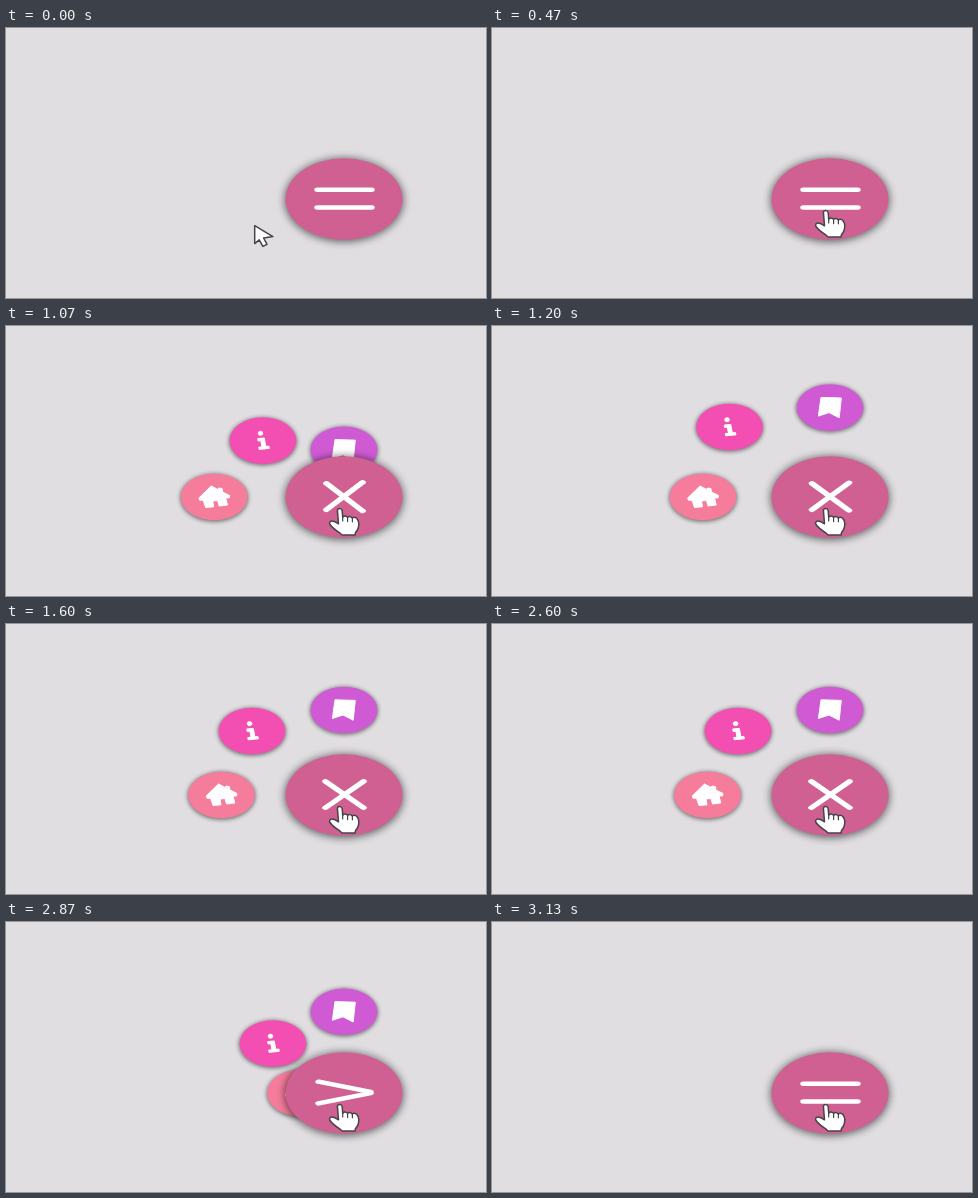
Write an HTML page that moves like this. It is 480 by 270 pixels and loops after 3.19 s.

```html
<!DOCTYPE html>
<html lang="en">
<head>
<meta charset="utf-8">
<title>Radial menu</title>
<style>
  html, body { margin: 0; width: 100%; height: 100%; overflow: hidden; background: #e0dee0; }
  svg { display: block; width: 100vw; height: 100vh; }
  .icon { fill: #fff; stroke: #fff; stroke-width: 1; stroke-linejoin: round; }
  .bar { stroke: #fff; stroke-width: 6.4; stroke-linecap: round; }
  .cursor { fill: #fff; stroke: #45434a; stroke-width: 1.5; stroke-linejoin: round; stroke-linecap: round; }
</style>
</head>
<body>
<svg viewBox="0 0 480 270">
  <defs>
    <filter id="soft" x="-30%" y="-30%" width="160%" height="160%"><feGaussianBlur stdDeviation="2"/></filter>
    <filter id="deep" x="-30%" y="-30%" width="160%" height="160%"><feGaussianBlur stdDeviation="4.5"/></filter>
  </defs>
  <g id="items"></g>
  <g transform="translate(338 171)">
    <ellipse cy="1" rx="59" ry="41.5" opacity=".6" filter="url(#deep)"/>
    <ellipse rx="58.5" ry="40.7" fill="#d06092"/>
    <g transform="translate(.5 -.4) scale(1 .69)">
      <path class="bar" d="M-27 0H27"/>
      <path class="bar" d="M-27 0H27"/>
    </g>
  </g>
  <path id="arrow" class="cursor" d="M.7.7V18.6L5.2 14.9 8.9 21.4 13 19.3 9.6 13 18.9 11.6Z"/>
  <g id="hand" class="cursor">
    <path d="M-2.6 1.4Q-2.4-.4-.4-.4T2.2 1.6L2.7 8.2Q5.3 5.9 7.5 8.3 10.1 6.4 12.3 8.9 15 7.5 16.9 9.6 18.8 11.4 18.8 14.5 18.9 20.2 15.5 23.6L15 26H2L-.3 23.8Q-7.4 19.2-10.2 15.2-11 12.6-8.3 12.1-5.2 12-1.5 14.8Z"/>
    <path fill="none" stroke-width="1.2" d="M2.7 8V12M7.6 8.4V12.6M12.4 9V12.8"/>
  </g>
</svg>
<script>
const LOOP = 3190, OPEN = 727, CLOSE = 2616, TICK = 200 / 3;

const items = [
  { dx: -122.5, dy: 0, time: 500, color: '#f67c9c',
    icon: 'M-3-11L3.5-7.6 4.5-9 8-8.4 8.4-5 15.5-1.5 15 1 11.5.8 13.3 8 5 9 3.5 3.5-1.5 4-.5 9.8-8.5 10.5-11 3.2-14.5 3.3-15.3 1Z' },
  { dx: -92, dy: -64, time: 600, color: '#f34fb3',
    icon: 'M-4.7-7.2a2.3 2 0 1 0 4.6-.3a2.3 2 0 1 0-4.6.3ZM-5.2-2L1.3-2.6 2.9 5.8 6 5.5 6.4 7.8-3.8 8.8-4.2 6.6-1 6.2-2.1.2-4.9.4Z' },
  { dx: 0, dy: -85, time: 700, color: '#cf5ad3',
    icon: 'M-9-10.2L11.3-9.6 9.2 10.2-1 5-11.6 8.5Z' }
];

const path = [[70, 248, 197], [300, 372, 155], [460, 334, 183]];

const $ = id => document.getElementById(id);
$('items').innerHTML = items.map(i => `<g>
  <ellipse cy=".8" rx="34" ry="24" opacity=".5" filter="url(#soft)"/>
  <ellipse rx="33.4" ry="23.3" fill="${i.color}"/>
  <path class="icon" d="${i.icon}"/></g>`).join('');
const groups = [...$('items').children];
const bars = document.querySelectorAll('.bar');

const cubic = (s, a, b) => 3 * (1 - s) ** 2 * s * a + 3 * (1 - s) * s * s * b + s ** 3;

// Ease in and out with a swing past both ends.
function swing(x) {
  if (x <= 0) return 0;
  if (x >= 1) return 1;
  let lo = 0, hi = 1;
  for (let n = 0; n < 24; n++) {
    const mid = (lo + hi) / 2;
    if (cubic(mid, .68, .265) < x) lo = mid; else hi = mid;
  }
  return cubic(lo, -.55, 1.55);
}

const spread = (t, time) => swing((t - OPEN) / time) - swing((t - CLOSE) / time);

function pointer(t) {
  if (t <= path[0][0]) return path[0].slice(1);
  for (let n = 1; n < path.length; n++) {
    const [t0, x0, y0] = path[n - 1], [t1, x1, y1] = path[n];
    if (t < t1) {
      const p = (t - t0) / (t1 - t0), e = p * p * (3 - 2 * p);
      return [x0 + (x1 - x0) * e, y0 + (y1 - y0) * e];
    }
  }
  return path[path.length - 1].slice(1);
}

// The picture advances 15 times a second, on whole hundredths.
function step(t) {
  const start = k => Math.round(k * TICK / 10) * 10;
  const k = Math.round(t / TICK);
  return start(k) > t ? start(k - 1) : start(k);
}

function draw(t) {
  items.forEach((item, n) => {
    const p = spread(t, item.time);
    groups[n].setAttribute('transform', `translate(${338 + item.dx * p} ${171 + item.dy * p})`);
  });

  const turn = spread(t, 500);
  bars.forEach((bar, n) => {
    const side = n ? 1 : -1;
    bar.setAttribute('transform', `translate(0 ${side * 12.9 * (1 - turn)}) rotate(${-side * 45 * turn})`);
  });

  const [x, y] = pointer(t);
  const over = ((x - 338) / 58.5) ** 2 + ((y - 171) / 40.7) ** 2 < 1;
  $('arrow').style.display = over ? 'none' : '';
  $('hand').style.display = over ? '' : 'none';
  $(over ? 'hand' : 'arrow').setAttribute('transform', `translate(${x} ${y})`);
}

const begin = performance.now();
function tick() {
  draw(step((performance.now() - begin) % LOOP));
  requestAnimationFrame(tick);
}
tick();
</script>
</body>
</html>
```
